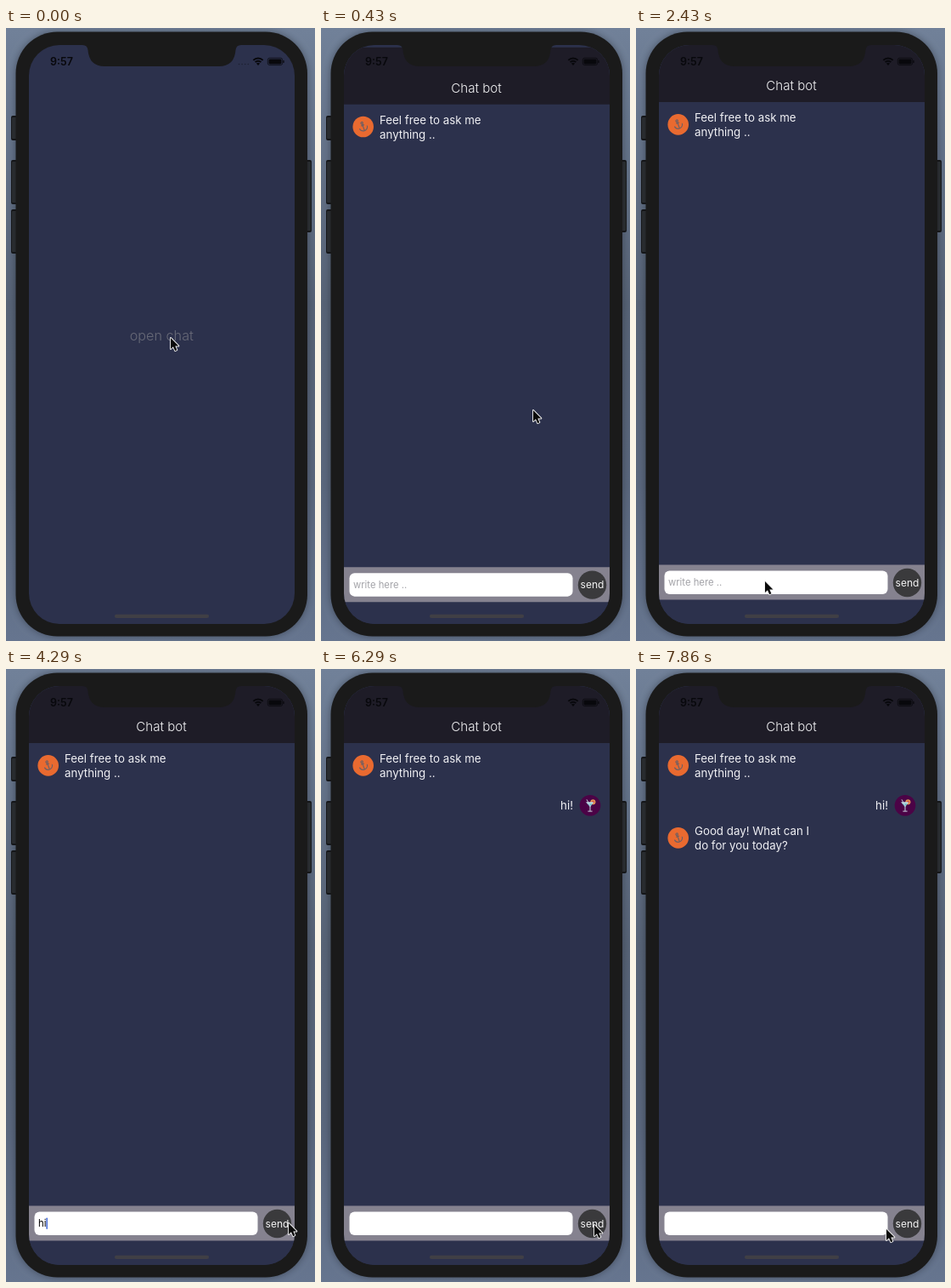
These frames come from a looping animation (364x720 px, 8000 ms). An HTML page with a canvas:

```html
<!DOCTYPE html>
<html lang="en">
<head>
<meta charset="utf-8">
<title>Chat bot</title>
<style>
  html, body { margin: 0; width: 100%; height: 100%; overflow: hidden; background: #5f6d84; }
  canvas { display: block; width: 364px; height: 720px; }
</style>
</head>
<body>
<canvas id="stage"></canvas>
<script>
const W = 364, H = 720, LOOP = 8000;
const NAVY = '#2c314c', BODY = '#1a1a1a';
const OPEN = 140, FOCUS = 2570, SENT = 6000, REPLY = 6430;
const canvas = document.getElementById('stage');
const ctx = canvas.getContext('2d');
const dpr = window.devicePixelRatio || 1;
canvas.width = W * dpr;
canvas.height = H * dpr;

// Pointer stops: time, x, y
const path = [
  [0, 194, 364], [140, 194, 364], [430, 250, 449], [1000, 224, 560],
  [1700, 170, 640], [2290, 152, 650], [2700, 152, 650], [3400, 333, 651],
  [4300, 333, 651], [5000, 335, 651], [5650, 335, 651], [5900, 322, 653],
  [7000, 322, 653], [7700, 295, 658], [8000, 295, 658]
];
// What the field holds from each time on
const typed = [[3430, 'h'], [3710, 'hi'], [4430, 'hi!'], [SENT, '']];

function box(x, y, w, h, r, fill) {
  ctx.beginPath();
  ctx.roundRect(x, y, w, h, r);
  ctx.fillStyle = fill;
  ctx.fill();
}

function disc(x, y, r, fill) {
  ctx.beginPath();
  ctx.arc(x, y, r, 0, Math.PI * 2);
  ctx.fillStyle = fill;
  ctx.fill();
}

function poly(points, fill) {
  ctx.beginPath();
  points.forEach(p => ctx.lineTo(p[0], p[1]));
  ctx.closePath();
  ctx.fillStyle = fill;
  ctx.fill();
}

function label(str, x, y, size, color, weight = 400, align = 'left') {
  ctx.font = `${weight} ${size}px Inter, "Liberation Sans", sans-serif`;
  ctx.textAlign = align;
  ctx.fillStyle = color;
  ctx.fillText(str, x, y);
}

function vertical(stops) {
  const g = ctx.createLinearGradient(0, 0, 0, H);
  stops.forEach(([at, color]) => g.addColorStop(at, color));
  return g;
}

function backdrop() {
  ctx.fillStyle = vertical([[0, '#718199'], [0.15, '#66758c'], [0.45, '#566275'],
                            [0.75, '#59667c'], [1, '#66758f']]);
  ctx.fillRect(0, 0, W, H);
}

function phone() {
  for (const [x, y, w, h] of [[6, 103, 8, 29], [6, 155, 8, 52], [6, 213, 8, 52], [353, 155, 7, 85]]) {
    box(x, y, w, h, 2, '#141517');
    box(x + 1, y + 2, w - 2, h - 4, 1, '#2b2e31');
  }
  ctx.save();
  ctx.shadowColor = 'rgba(20,24,32,.45)';
  ctx.shadowBlur = 8 * dpr;
  box(11.5, 4.5, 343.5, 710, 49, BODY);
  ctx.restore();
}

function notch() {
  ctx.beginPath();
  ctx.moveTo(90, 18);
  ctx.lineTo(90, 20);
  ctx.quadraticCurveTo(96, 20, 96.5, 26);
  ctx.quadraticCurveTo(98, 45, 116, 45);
  ctx.lineTo(251, 45);
  ctx.quadraticCurveTo(269, 45, 270.5, 26);
  ctx.quadraticCurveTo(271, 20, 277, 20);
  ctx.lineTo(277, 18);
  ctx.fillStyle = BODY;
  ctx.fill();
}

function statusBar(dots) {
  label('9:57', 52, 44, 12.5, '#08080c', 600);
  if (dots) for (let i = 0; i < 4; i++) disc(274.5 + i * 3.6, 42.5, 0.8, '#1d2033');
  ctx.strokeStyle = '#08080c';
  ctx.lineWidth = 2;
  for (const r of [4.8, 8]) {
    ctx.beginPath();
    ctx.arc(297, 43.5, r, -Math.PI * 0.75, -Math.PI * 0.25);
    ctx.stroke();
  }
  poly([[297, 44], [294.8, 41.6], [297, 40.7], [299.2, 41.6]], '#08080c');
  ctx.lineWidth = 0.7;
  ctx.beginPath();
  ctx.roundRect(308.3, 35.2, 17.4, 8.4, 2.4);
  ctx.stroke();
  box(309.5, 36.4, 15, 6, 1.3, '#08080c');
  box(326.4, 38, 1.2, 3, 0.6, '#08080c');
}

function botAvatar(y) {
  disc(49.7, y, 12.3, '#e96a30');
  ctx.save();
  ctx.translate(49.7, y);
  ctx.rotate(-0.35);
  ctx.strokeStyle = '#705f62';
  ctx.lineWidth = 1.2;
  ctx.beginPath();
  ctx.arc(0, -4.6, 1.2, 0, 7);
  ctx.moveTo(0, -3.4);
  ctx.lineTo(0, 4.6);
  ctx.moveTo(-2, -1.8);
  ctx.lineTo(2, -1.8);
  ctx.moveTo(5, 0.6);
  ctx.arc(0, 0, 4.9, 0.12, Math.PI - 0.12);
  ctx.stroke();
  ctx.restore();
}

function userAvatar(x, y) {
  disc(x, y, 12.3, '#4b0346');
  disc(x + 3.4, y - 4, 3, '#e8a05a');
  disc(x + 3.4, y - 4, 1.8, '#d8503f');
  poly([[x - 5, y - 4], [x + 4.5, y - 4], [x, y + 1.6]], '#b8dce4');
  poly([[x - 3, y - 2], [x + 2.6, y - 2], [x, y + 1.2]], '#62b5c5');
  ctx.strokeStyle = '#c8d5df';
  ctx.lineWidth = 1;
  ctx.beginPath();
  ctx.moveTo(x - 4, y - 7);
  ctx.lineTo(x, y);
  ctx.lineTo(x, y + 6.5);
  ctx.moveTo(x - 2.6, y + 6.8);
  ctx.lineTo(x + 2.6, y + 6.8);
  ctx.stroke();
}

function botSays(y, lines) {
  botAvatar(y);
  lines.forEach((line, i) => label(line, 69, y - 3.3 + i * 17, 13.3, '#f0f0f4'));
}

function field(t) {
  box(27, 630.5, 313, 41, 0, '#85828f');
  box(33.5, 637.5, 263, 27.5, 6, '#fff');
  disc(319.5, 651.5, 16.7, '#3a3a3c');
  label('send', 319.5, 655.5, 12, '#f4f4f4', 400, 'center');
  const step = typed.filter(s => t >= s[0]).pop();
  if (!step) label('write here ..', 38, 655, 11.3, '#a3a3a8');
  const str = step ? step[1] : '';
  label(str, 38, 655, 11.3, '#000');
  if (t >= FOCUS && t < SENT && t % 1000 < 550) {
    box(38 + ctx.measureText(str).width, 644.5, 1.5, 13.5, 0.7, '#3f66d8');
  }
}

function chat(t) {
  box(27, 20, 313, 680, 0, NAVY);
  box(27, 20, 313, 67, 0, '#1e1c27');
  label('Chat bot', 183, 73.3, 15.1, '#f3f3f5', 300, 'center');
  botSays(113.4, ['Feel free to ask me', 'anything ..']);
  if (t >= SENT) {
    label('hi!', 297, 165, 13.3, '#f0f0f4', 400, 'right');
    userAvatar(317, 160.3);
  }
  if (t >= REPLY) botSays(198.4, ['Good day! What can I', 'do for you today?']);
  field(t);
}

// Critically damped spring, already under way when first seen
function slide(t) {
  const k = 0.022 * (t - OPEN + 60);
  return t > 900 ? 0 : 680 * (1 + k) * Math.exp(-k);
}

function pointerAt(t) {
  const i = Math.max(1, path.findIndex(p => p[0] > t));
  const [t0, x0, y0] = path[i - 1], [t1, x1, y1] = path[i];
  const u = (t - t0) / (t1 - t0), e = u * u * (3 - 2 * u);
  return [x0 + (x1 - x0) * e, y0 + (y1 - y0) * e];
}

function pointer(x, y) {
  const shape = [[0, 0], [0, 13], [3, 10.3], [5.2, 15.2], [7.4, 14.2], [5.3, 9.5], [9.4, 9.5]];
  ctx.save();
  ctx.translate(x, y);
  ctx.lineJoin = 'round';
  ctx.lineWidth = 1.8;
  ctx.strokeStyle = '#f2f2f2';
  poly(shape, '#0a0a0a');
  ctx.stroke();
  poly(shape, '#0a0a0a');
  ctx.restore();
}

function draw(t) {
  ctx.setTransform(dpr, 0, 0, dpr, 0, 0);
  backdrop();
  phone();
  ctx.save();
  ctx.beginPath();
  ctx.roundRect(27, 20, 313, 680, 36);
  ctx.clip();
  box(27, 20, 313, 680, 0, NAVY);
  label('open chat', 183.3, 366.7, 16.2, '#686a78', 300, 'center');
  if (t >= OPEN) {
    ctx.save();
    ctx.translate(0, slide(t));
    chat(t);
    ctx.restore();
  }
  statusBar(t < 300);
  box(128, 688.7, 111, 4.3, 2.1, '#403f45');
  ctx.restore();
  notch();
  pointer(...pointerAt(t));
}

function frame() {
  draw(performance.now() % LOOP);
  requestAnimationFrame(frame);
}
frame();
</script>
</body>
</html>
```
